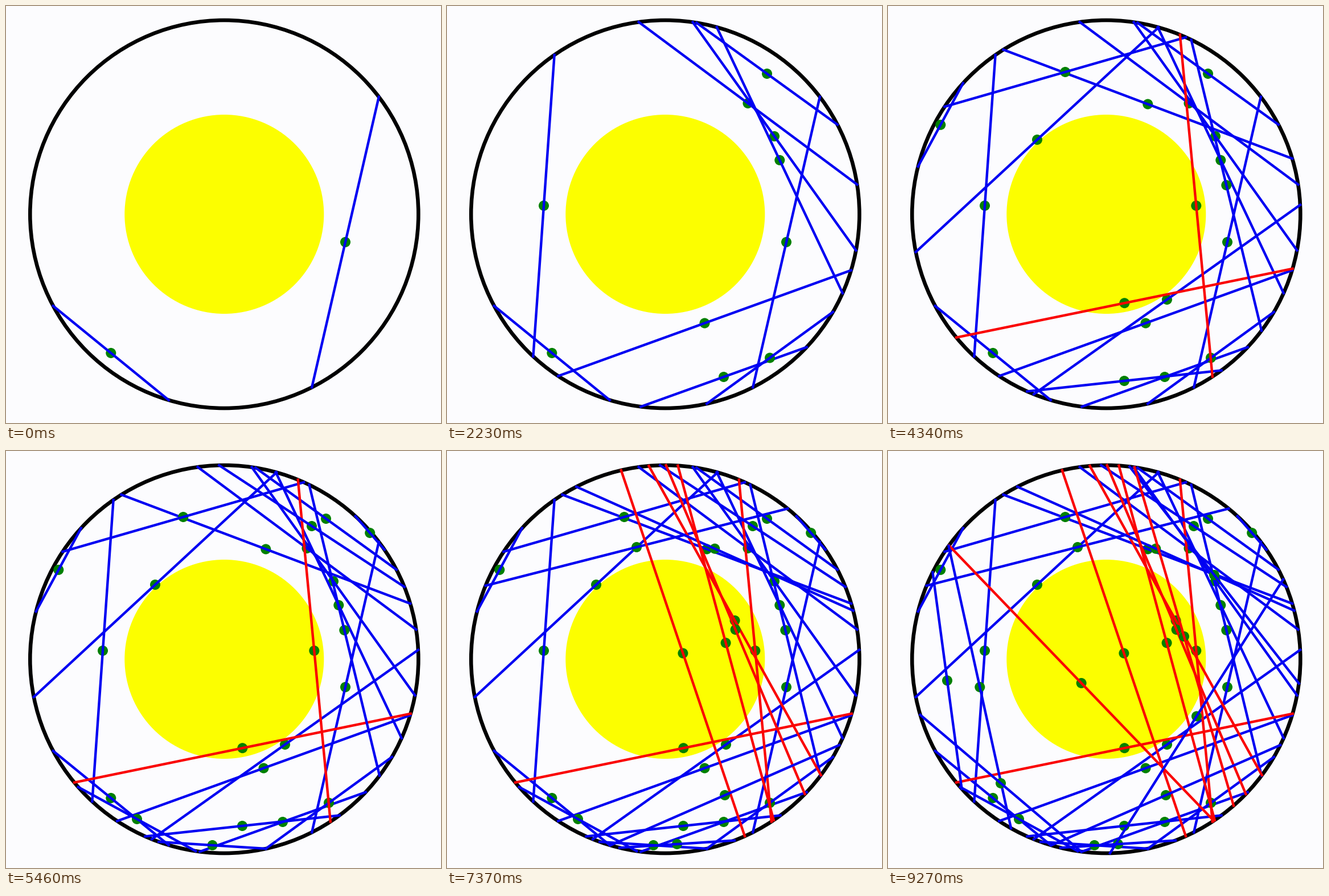
A matplotlib script that plays this animation: 764x733 px, repeating every 9310 ms.

```python
import math

import matplotlib.pyplot as plt
from matplotlib.animation import FuncAnimation
from matplotlib.patches import Circle

W, H, DPI = 764, 733, 100
CX, CY, R = 383.3, 366, 341
FRAMES, INTERVAL = 245, 38
STEP, DELAY = 250, 60  # ms between chords, ms before the count starts

BACK, SUN = "#fcfcfe", "#fcfe00"
SHORT, LONG, DOT = "#0000f2", "#fa0202", "#008000"

# chord midpoints in order of appearance
MIDS = [
    (596, 415), (184.3, 610),
    (528.5, 171), (452.5, 557.5), (575, 229), (486, 652), (567, 618.5),
    (562, 119), (170, 351), (584.3, 271), (92.3, 208.9), (490, 516),
    (415, 659), (415.3, 522.2),
    (456.3, 172.5), (594.3, 315), (262, 235), (311.3, 116), (541.3, 351),
    (537, 132), (639.2, 144), (230, 647), (362.5, 693),
    (333, 169), (505.6, 298), (470.3, 171.7), (414.4, 355.5), (404, 691),
    (506.6, 314), (488, 605), (489.6, 337.3),
    (104, 403.5), (573, 218), (339.6, 408), (161.3, 415), (198, 584),
    (520, 326), (542, 466.3),
]


def px(n):
    """Pixels to points."""
    return n * 72 / DPI


def chord_ends(x, y):
    dx, dy = x - CX, y - CY
    d = math.hypot(dx, dy)
    k = math.sqrt(R * R - d * d) / d
    return [x - dy * k, x + dy * k], [y + dx * k, y - dx * k]


fig = plt.figure(figsize=(W / DPI, H / DPI), dpi=DPI, facecolor=BACK)
ax = fig.add_axes([0, 0, 1, 1])
ax.set_xlim(0, W)
ax.set_ylim(H, 0)
ax.axis("off")

ax.add_patch(Circle((CX, CY), 175, fc=SUN, ec="none", zorder=1))
ax.add_patch(Circle((CX, CY), R, fill=False, ec="black", lw=px(6.6), zorder=2))

chords = []
for i, (x, y) in enumerate(MIDS):
    color = LONG if math.hypot(x - CX, y - CY) < R / 2 else SHORT
    dot = ax.add_patch(Circle((x, y), 9, fc=DOT, ec="none", zorder=3 + i))
    line, = ax.plot(*chord_ends(x, y), color=color, lw=px(4.4), zorder=3.5 + i)
    chords.append((dot, line))


def update(n):
    count = 2 + max(0, (n * INTERVAL - DELAY) // STEP)
    for i, pair in enumerate(chords):
        for artist in pair:
            artist.set_visible(i < count)
    return [a for pair in chords for a in pair]


anim = FuncAnimation(fig, update, frames=FRAMES, interval=INTERVAL,
                     repeat=True, repeat_delay=0, blit=False)
plt.show()
```
